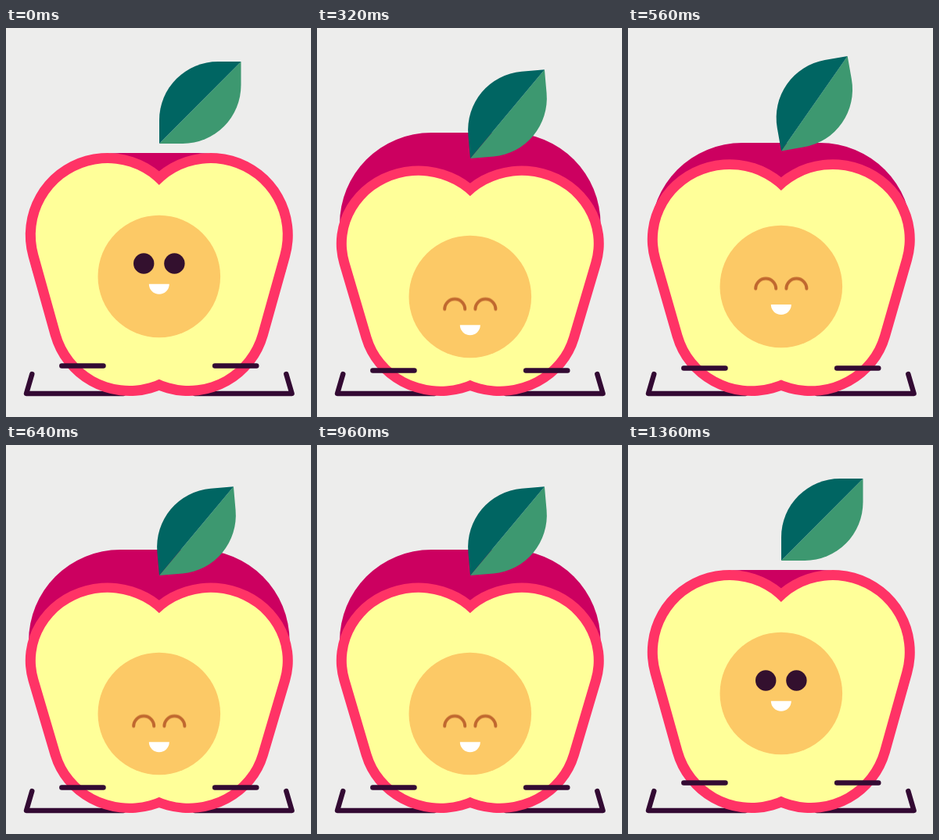
Write an HTML page that moves like this. It is 390 by 498 pixels and loops after 1.44 s.

```html
<!DOCTYPE html>
<html lang="en">
<head>
<meta charset="utf-8">
<title>Bouncing apple</title>
<style>
  @property --dip { syntax: "<number>"; inherits: true; initial-value: 0; }
  @property --sway { syntax: "<angle>"; inherits: true; initial-value: 0deg; }

  html, body { margin: 0; width: 100%; height: 100%; overflow: hidden; background: #ededec; }

  svg {
    display: block;
    width: 390px;
    height: 498px;
    animation: dip 1440ms steps(2) infinite, sway 1440ms steps(2) infinite;
  }

  .back { transform: translateY(calc(var(--dip) * -26px)); }
  .flesh { transform-origin: 0 471px; transform: scaleY(calc(1 - var(--dip) * .053)); }
  .core { transform: translateY(calc(var(--dip) * 26px)); }
  .face { transform: translateY(calc(var(--dip) * 52.5px)); }
  .knee { transform: translateY(calc(var(--dip) * 6px)); }
  .leaf {
    transform-origin: 196px 148px;
    transform: translateY(calc(var(--dip) * 19px)) rotate(var(--sway));
  }
  .open { animation: open 1440ms step-end infinite; }
  .shut { animation: shut 1440ms step-end infinite; }

  .line { fill: none; stroke-linecap: round; stroke-linejoin: round; }
  .limb { stroke: #330a33; stroke-width: 6.4; }
  .rind { stroke: #ff3366; stroke-width: 210; }
  .pulp { stroke: #ffff99; stroke-width: 184; }

  @keyframes dip {
    0%, 11.111%, 33.333%, 55.555%, 77.777%, 100% { --dip: 0; }
    22.222%, 44.444%, 66.666% { --dip: 1; }
  }
  @keyframes sway {
    0%, 5.555%, 27.777%, 50%, 72.222%, 94.444%, 100% { --sway: 0deg; }
    16.666%, 38.888%, 61.111%, 83.333% { --sway: -10deg; }
  }
  @keyframes open {
    0%, 77.777% { opacity: 1; }
    16.666% { opacity: 0; }
  }
  @keyframes shut {
    0%, 77.777% { opacity: 0; }
    16.666% { opacity: 1; }
  }
</style>
</head>
<body>
<svg viewBox="0 0 390 498">
  <defs>
    <path id="foot" d="M33.3 443 L26 468 H150"/>
    <path id="knee" d="M71.3 432.5 H124.5"/>
    <path id="lobe" d="M129.8 265 L158 366"/>
    <g id="mirror"></g>
  </defs>

  <g class="line limb">
    <use href="#foot"/>
    <use href="#foot" transform="matrix(-1 0 0 1 391.6 0)"/>
  </g>

  <rect class="back" x="29" y="160" width="333.6" height="234" rx="117" fill="#cc0060"/>

  <g class="flesh line">
    <g class="rind">
      <use href="#lobe"/>
      <use href="#lobe" transform="matrix(-1 0 0 1 391.6 0)"/>
    </g>
    <g class="pulp">
      <use href="#lobe"/>
      <use href="#lobe" transform="matrix(-1 0 0 1 391.6 0)"/>
    </g>
  </g>

  <circle class="core" cx="195.8" cy="318" r="78.3" fill="#fcc966"/>

  <g class="face">
    <g class="open" fill="#33102e">
      <circle cx="176.2" cy="301.5" r="13.2"/>
      <circle cx="215.4" cy="301.5" r="13.2"/>
    </g>
    <path class="shut line" stroke="#c0682f" stroke-width="4"
      d="M163.2 307.5 a13 13 0 0 1 26 0 M202.4 307.5 a13 13 0 0 1 26 0"/>
    <path d="M182.8 327.8 h26 a13 13 0 0 1 -26 0 Z" fill="#fff"/>
  </g>

  <g class="knee line limb">
    <use href="#knee"/>
    <use href="#knee" transform="matrix(-1 0 0 1 391.6 0)"/>
  </g>

  <g class="leaf">
    <path d="M196 148 H226 A74.5 75 0 0 0 300.5 73 V43 Z" fill="#3d9870"/>
    <path d="M196 148 V118 A75 75 0 0 1 271 43 H300.5 Z" fill="#006562"/>
  </g>
</svg>
</body>
</html>
```
